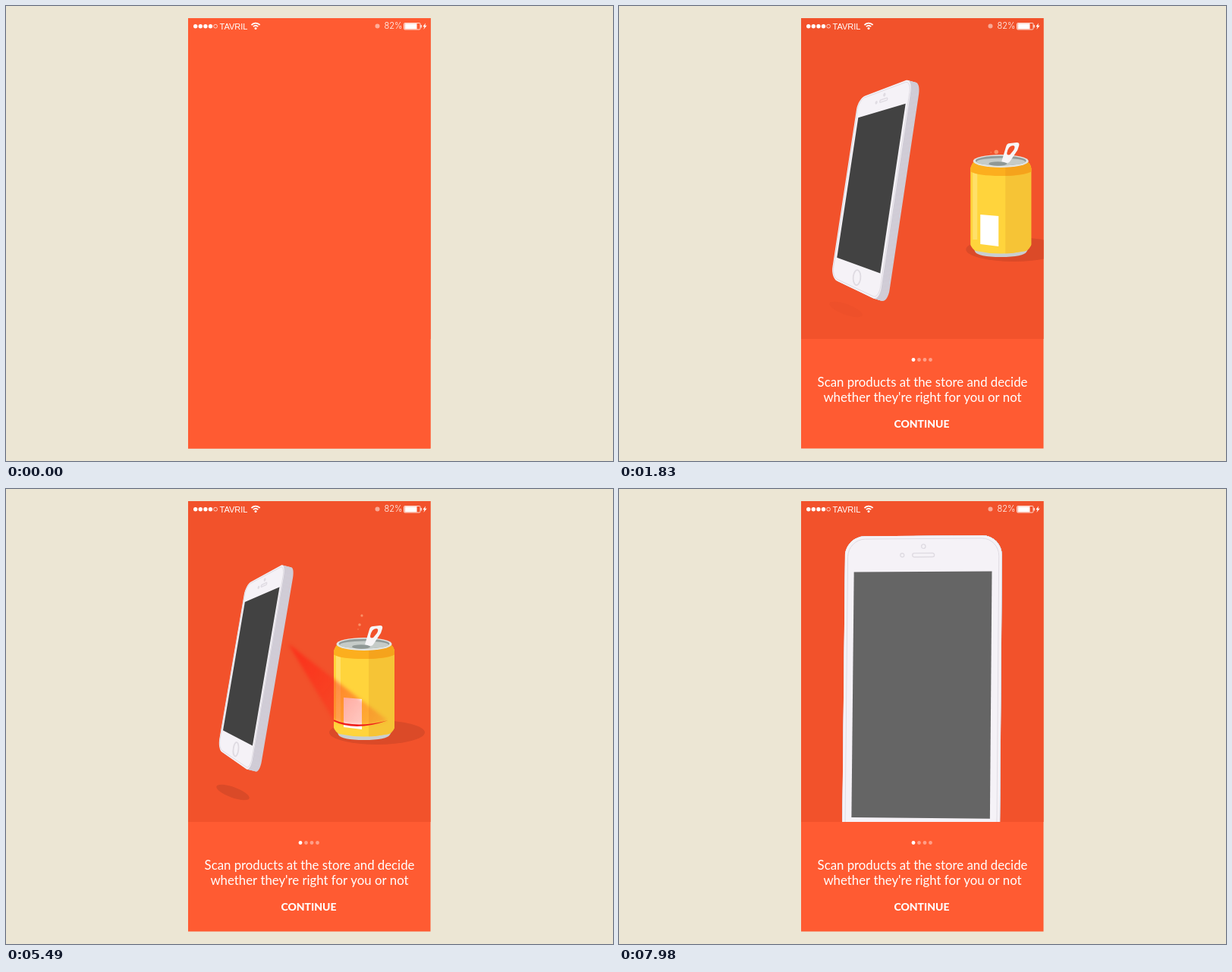
Write an HTML page with a canvas that moves like this. It is 800x600 px and loops after 8 s.

```html
<!DOCTYPE html>
<html lang="en">
<head>
<meta charset="utf-8">
<title>Scan products</title>
<style>
  html, body { margin: 0; width: 100%; height: 100%; overflow: hidden; background: #ece6d4; }
  canvas { display: block; }
</style>
</head>
<body>
<canvas id="stage" width="800" height="600"></canvas>
<script>
const ctx = document.getElementById('stage').getContext('2d');
const LOOP = 8000;
const ORANGE = '#ff5b32', SCENE = '#f2522b';

// Corners of the phone face (TL, TR, BR, BL) and the depth offset of its side.
const POSES = [
  { corners: [[297, 59], [508, 59], [507, 488], [295, 488]], depth: [0, 0] },
  { corners: [[312, 104], [465, 84], [434, 460], [280, 427]], depth: [6, 4] },
  { corners: [[316, 126], [369, 97], [322, 373], [279, 343]], depth: [12, 3] }
];

// Each bubble rises through (x, y) at time t.
const BUBBLES = [
  [466, 152, 2730, 2.7], [459, 152.5, 2730, .7], [469, 191, 2730, 1.6],
  [466, 149, 4410, 1.6], [469, 182, 4410, 1.6], [457, 191, 4410, 1.6],
  [469, 167, 5490, 1.6], [466, 179, 5490, 1.8], [464, 185, 5490, .7],
  [466, 161, 7020, 2.6], [459, 161, 7020, .7]
];

const clamp = x => Math.max(0, Math.min(1, x));
const span = (t, from, to) => clamp((t - from) / (to - from));
const mix = (a, b, p) => a + (b - a) * p;
const mixPoint = (a, b, p) => [mix(a[0], b[0], p), mix(a[1], b[1], p)];
const easeOut = p => 1 - (1 - p) ** 2;
const easeInOut = p => (1 - Math.cos(Math.PI * p)) / 2;

function fill(color, trace) {
  ctx.beginPath();
  trace();
  ctx.fillStyle = color;
  ctx.fill();
}

function stroke(color, width, trace) {
  ctx.beginPath();
  trace();
  ctx.strokeStyle = color;
  ctx.lineWidth = width;
  ctx.stroke();
}

const ellipse = (x, y, rx, ry = rx, turn = 0) => () => ctx.ellipse(x, y, rx, ry, turn, 0, 2 * Math.PI);
const rect = (...box) => () => ctx.rect(...box);
const path = d => new Path2D(d);

function fillPath(color, d) {
  ctx.fillStyle = color;
  ctx.fill(path(d), 'evenodd');
}

function text(str, x, y, font, align = 'center') {
  ctx.font = font;
  ctx.textAlign = align;
  ctx.fillStyle = '#fff';
  ctx.fillText(str, x, y);
}

function poseAt(time) {
  const early = time < 1440;
  const p = early ? span(time, 960, 1440) ** 2 : easeOut(span(time, 1440, 2130));
  const [a, b] = early ? POSES : POSES.slice(1);
  return {
    corners: a.corners.map((c, i) => mixPoint(c, b.corners[i], p)),
    depth: mixPoint(a.depth, b.depth, p)
  };
}

function drawPhone(time, glow) {
  const { corners: [tl, tr, br, bl], depth } = poseAt(time);
  const at = (u, v) => mixPoint(mixPoint(tl, tr, u), mixPoint(bl, br, u), v);
  const round = (u0, v0, u1, v1, ru = 0, rv = 0) => () => {
    ctx.moveTo(...at(u0 + ru, v0));
    [[u1, v0, -1, 0, 0, 1], [u1, v1, 0, -1, -1, 0], [u0, v1, 1, 0, 0, -1], [u0, v0, 0, 1, 1, 0]]
      .forEach(([u, v, au, av, bu, bv]) => {
        ctx.lineTo(...at(u + au * ru, v + av * rv));
        ctx.bezierCurveTo(...at(u + au * ru * .45, v + av * rv * .45),
          ...at(u + bu * ru * .45, v + bv * rv * .45), ...at(u + bu * ru, v + bv * rv));
      });
    ctx.closePath();
  };
  const body = round(0, 0, 1, 1, .125, .062);
  const spot = (u, v, r) => round(u - r, v - r / 2, u + r, v + r / 2, r, r / 2);

  for (let i = 12; i > 0; i--) {
    ctx.save();
    ctx.translate(depth[0] * i / 12, depth[1] * i / 12);
    fill('#d0ccd6', body);
    ctx.restore();
  }
  fill('#f5f2f7', body);
  const line = '#dfdbe2';
  stroke(line, 1, round(.018, .009, .982, .991, .11, .055));
  stroke(line, 1.4, spot(.5, .033, .013));
  stroke(line, 1.4, spot(.365, .06, .012));
  stroke(line, 1.4, round(.43, .054, .57, .066, .012, .006));
  stroke(line, 1.8, spot(.5, .94, .073));
  const shade = Math.round(mix(66, 101, glow));
  fill(`rgb(${shade},${shade},${shade})`, round(.058, .112, .938, .88));
}

function drawCan() {
  fill('#db4a28', ellipse(489, 321, 63, 16));
  fillPath('#c9ced0', 'M435 316 L438 324 Q442 331 472 331 Q502 331 506 324 L510 316 Z');
  const body = 'M432 214 Q434 207 438 204 L506 204 Q511 208 512 214 L512 315 Q509 321 505 323 Q472 330 439 323 Q434 320 432 315 Z';
  fillPath('#ffd43c', body);
  ctx.save();
  ctx.clip(path(body));
  fill('#f6c436', rect(478, 200, 40, 135));
  fill('#ffe068', rect(435, 218, 6, 90));
  fillPath('#fcae1e', 'M430 200 H514 V217 Q506 224 472 224 Q438 224 430 217 Z');
  fillPath('#f5a31c', 'M478 200 H514 V217 Q506 223 478 224 Z');
  ctx.restore();

  fill('#e2e5e3', ellipse(472, 204.5, 36.5, 8.5));
  fill('#929b99', ellipse(472, 204, 33.5, 6.5));
  fill('#c5cbc8', ellipse(472, 205.5, 32, 5));
  fill('#8f9896', ellipse(468, 208, 12, 2.7));
  fillPath('#f7f5f7', 'M473 205 L479 185 Q480 181 484 181 L493 180 Q497 180 496 184 L494 190 L484 205 Q483 207 480 207 Z'
    + 'M480 194 Q480 198 484 196 L489 190 Q492 184 488 184 Q482 184 480 194 Z');
  fillPath('#fff', 'M445 275 L469 277 V317 L445 314 Z');
}

function drawBubbles(t) {
  for (const [x, y0, seen, r] of BUBBLES) {
    const y = y0 - (t - seen) * .045;
    if (y > 195 || y < 144) continue;
    ctx.globalAlpha = .65 * clamp((y - 144) / 4);
    fill('#ffb488', ellipse(x, y, r));
  }
  ctx.globalAlpha = 1;
}

function drawBeam(t) {
  const power = span(t, 2400, 3000) * (1 - span(t, 6500, 6950));
  if (!power) return;
  const y = 272 + 41 * easeInOut(span(t, 2730, 6600));
  const right = mix(432, 504, span(t, 2400, 3050));
  const lineAlpha = span(t, 2750, 3100) * (1 - span(t, 6400, 6800));

  ctx.save();
  ctx.beginPath();
  ctx.rect(360, 190, right - 360, 150);
  ctx.clip();
  const light = ctx.createLinearGradient(372, 205, 504, y);
  light.addColorStop(0, 'rgba(255,35,20,.75)');
  light.addColorStop(.45, 'rgba(255,45,25,.5)');
  light.addColorStop(1, 'rgba(255,60,30,.18)');
  ctx.globalAlpha = power;
  ctx.filter = 'blur(2px)';
  fill(light, () => {
    ctx.moveTo(372, 204);
    ctx.lineTo(432, y);
    ctx.quadraticCurveTo(462, y + 11, 503, y);
    ctx.closePath();
  });
  ctx.filter = 'none';
  ctx.globalAlpha = lineAlpha;
  fill('#f01f1c', () => {
    ctx.moveTo(432, y - 1);
    ctx.quadraticCurveTo(460, y + 11, 503, y);
    ctx.quadraticCurveTo(460, y + 15, 432, y + 1);
  });
  ctx.restore();
}

function drawScene(t) {
  // The closing move replays the opening one backwards, a little faster.
  const time = t < 7230 ? t : 2130 - (t - 7230) * 1.38;
  const slide = 135 * (1 - easeOut(span(time, 1530, 2110)));

  ctx.save();
  ctx.beginPath();
  ctx.rect(240, 16, 319.5, 423);
  ctx.clip();
  fill(SCENE, rect(240, 16, 320, 423));
  ctx.globalAlpha = span(time, 1770, 2100);
  fill('#da4a28', ellipse(299, 400, 23, 7, .35));
  ctx.globalAlpha = 1;
  ctx.save();
  ctx.translate(slide, 0);
  drawCan();
  drawBubbles(t);
  ctx.restore();
  drawBeam(t);
  drawPhone(time, span(t, 7780, 7980));
  ctx.restore();
}

function drawCaption() {
  [388, 395.5, 403, 410.5].forEach((x, i) =>
    fill(i ? 'rgba(255,255,255,.42)' : '#fff', ellipse(x, 466.5, 2.4)));
  const font = '16.8px Lato, sans-serif';
  text('Scan products at the store and decide', 400, 502, font);
  text("whether they're right for you or not", 400, 522, font);
  text('CONTINUE', 399, 556, '800 14px Lato, sans-serif');
}

function drawStatusBar() {
  [249.7, 256.3, 262.9, 269.5].forEach(x => fill('#fff', ellipse(x, 26.7, 2.7)));
  stroke('#fff', .7, ellipse(276.1, 26.7, 2.4));
  text('TAVRIL', 281.5, 30.5, '11px "Liberation Sans", sans-serif', 'left');
  fill('#fff', ellipse(329, 29.6, 1.5));
  [4.2, 7.4].forEach(r => stroke('#fff', 1.7, () => ctx.arc(329, 30, r, -Math.PI * .77, -Math.PI * .23)));

  fill('rgba(255,255,255,.5)', ellipse(489.5, 26.5, 3));
  text('82%', 498.5, 30.3, '300 11px Inter, sans-serif', 'left');
  stroke('#fff', .8, () => ctx.roundRect(524.5, 22.5, 21.5, 8.5, 1.2));
  fill('#fff', rect(525.5, 23.2, 16, 7.2));
  fill('#fff', rect(546.5, 25, 1.3, 3.5));
  fillPath('#fff', 'M553 22.5 L549.3 27.3 H551.5 L550.3 31 L554.6 25.8 H552.2 Z');
}

function draw(t) {
  fill('#ece6d4', rect(0, 0, 800, 600));
  fill(ORANGE, rect(240, 16, 319.5, 567.5));
  drawScene(t);
  drawCaption();
  ctx.globalAlpha = 1 - span(t, 120, 360);
  fill(ORANGE, rect(240, 16, 319.5, 567.5));
  ctx.globalAlpha = 1;
  drawStatusBar();
}

const start = performance.now();
function tick() {
  draw((performance.now() - start) % LOOP);
  requestAnimationFrame(tick);
}
tick();
</script>
</body>
</html>
```
